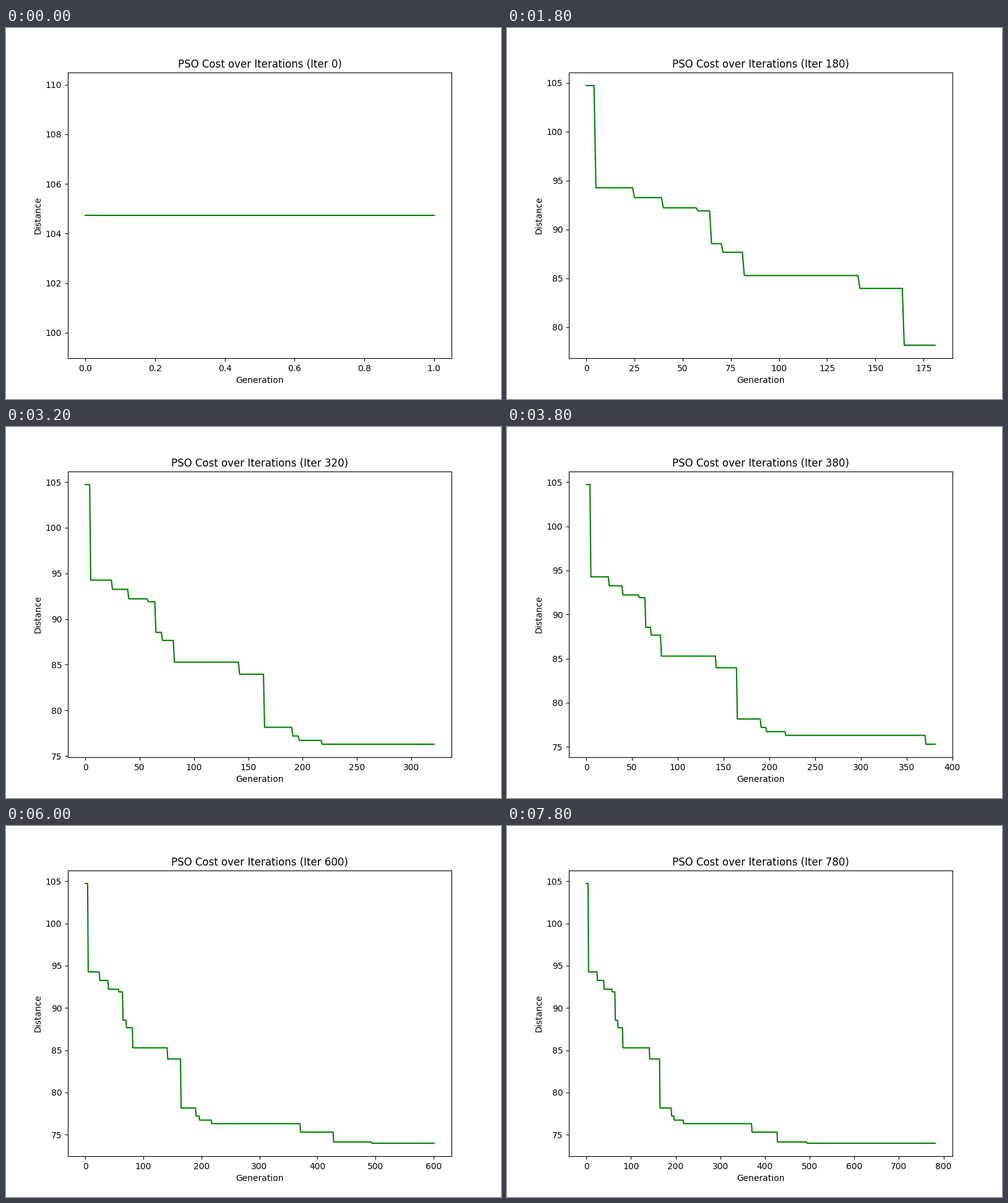
A matplotlib script for the animation above (8 s loop, 800 by 600 pixels).

```python
import numpy as np
import matplotlib.pyplot as plt
from matplotlib.animation import FuncAnimation

STEP = 20        # generations added per frame
FRAMES = 40
INTERVAL = 200   # ms

# key points: generation of an improvement -> best distance from then on
BESTS = {
    0: 104.732, 5: 94.266, 25: 93.257, 40: 92.216, 58: 91.9, 65: 88.55,
    71: 87.66, 82: 85.282, 142: 83.961, 165: 78.15, 191: 77.2, 197: 76.72,
    218: 76.3, 371: 75.296, 428: 74.135, 494: 73.985,
}


def best_cost(gens):
    """Best distance so far: it holds until the next improvement."""
    found = np.searchsorted(list(BESTS), gens, side="right") - 1
    return np.array(list(BESTS.values()))[found]


plt.rcParams["font.family"] = "DejaVu Sans"
fig, ax = plt.subplots(figsize=(8, 6), dpi=100)


def draw(frame):
    it = frame * STEP
    gens = np.arange(it + 2)
    ax.clear()
    ax.plot(gens, best_cost(gens), color="green")
    ax.set_title(f"PSO Cost over Iterations (Iter {it})")
    ax.set_xlabel("Generation")
    ax.set_ylabel("Distance")


def reset():
    draw(0)


anim = FuncAnimation(fig, draw, frames=FRAMES, init_func=reset,
                     interval=INTERVAL, repeat=True)
plt.show()
```
